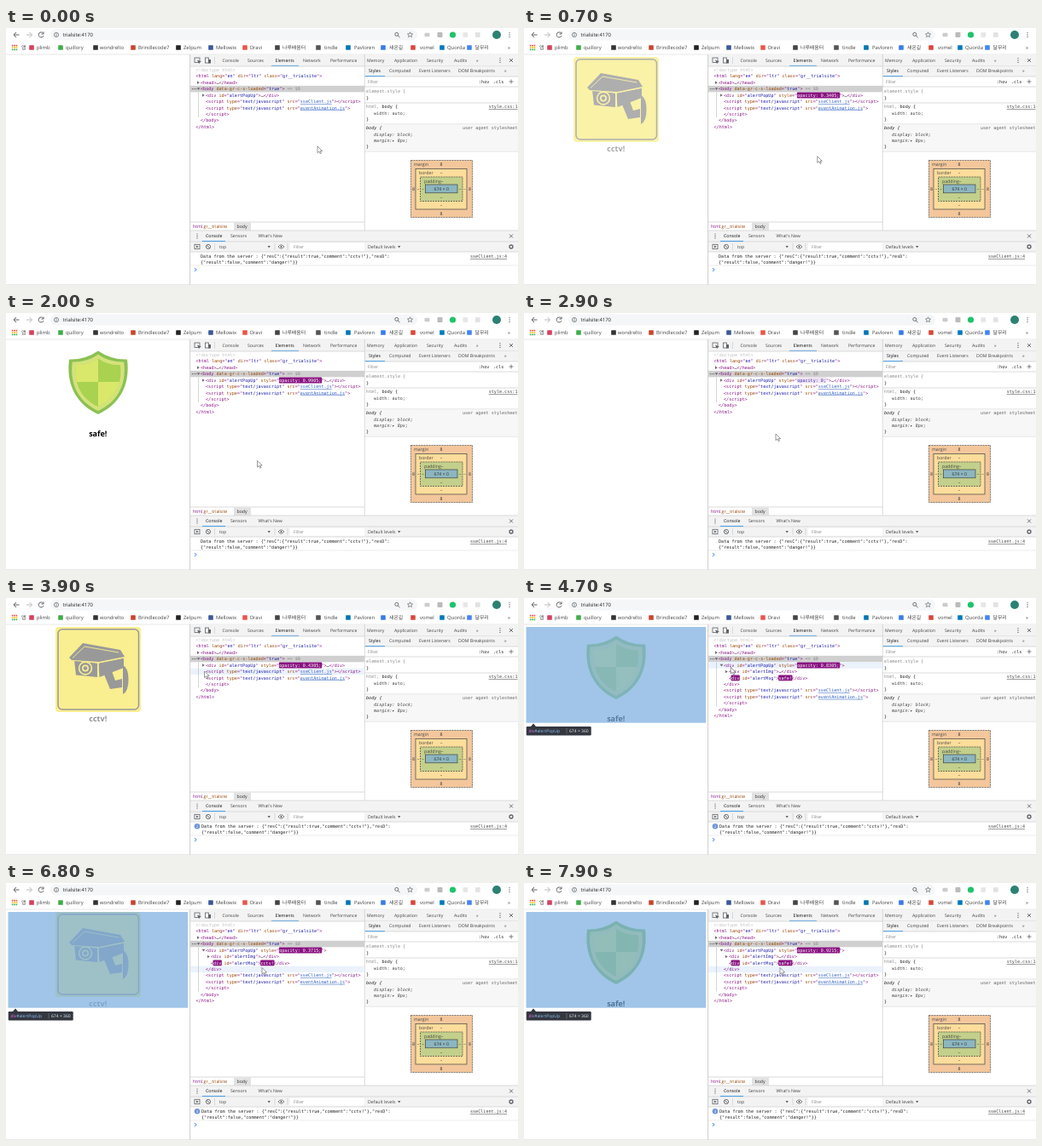
Write an HTML page that moves like this. It is 600 by 302 pixels and loops after 8000 ms.

```html
<!DOCTYPE html>
<html lang="en">
<head>
<meta charset="utf-8">
<title>Alert popup in the inspector</title>
<style>
html, body { margin: 0; width: 100%; height: 100%; overflow: hidden; background: #fff; }
svg { display: block; width: 100vw; height: 100vh; font-family: "Open Sans", "Noto Sans CJK KR", "Noto Sans CJK", sans-serif; }
text { white-space: pre; text-rendering: geometricPrecision; font-size: 5.2px; fill: #444; }
.bar { font-size: 5.9px; }
.tip { font-size: 5px; }
.mono { font-size: 5.125px; font-family: "DejaVu Sans Mono", monospace; }
.msg { font-size: 9px; font-weight: bold; font-family: "Noto Sans", sans-serif; fill: #000; }
</style>
</head>
<body>
<svg viewBox="0 0 600 302" xmlns="http://www.w3.org/2000/svg">
  <g id="base"></g><g id="page"></g><g id="overlay"></g><g id="tree"></g><g id="log"></g>
  <path id="cursor" d="M0 0V7.6L1.9 6 3.2 8.7 4.5 8.1 3.2 5.6H5.6Z" fill="#fff" stroke="#555" stroke-width=".6"/>
</svg>
<script>
const LOOP = 8000, STEP = 100, FADE = 2000, FLASH = 1000, SWAP = 1000, EXPAND = 4400;
const STARTS = [19, 3039, 6057];
const CHAR = 3.085, ROW = 7.45, TOP = 45.5;
const TAG = '#881280', ATTR = '#994500', VALUE = '#1a1aa6', LINK = '#2f5fc0', GREY = '#888', EDGE = '#ccc';
const PANEL = '#f3f3f3', ICON = '#5f6368', ACTIVE = '#4fa3e8';
const $ = id => document.getElementById(id);
const esc = s => s.replace(/&/g, '&amp;').replace(/</g, '&lt;');

const text = (x, y, s, attrs = '') => `<text x="${x}" y="${y}" ${attrs}>${esc(s)}</text>`;
const rect = (x, y, w, h, fill, attrs = '') => `<rect x="${x}" y="${y}" width="${w}" height="${h}" fill="${fill}" ${attrs}/>`;
const disc = (x, y, r, fill, attrs = '') => `<circle cx="${x}" cy="${y}" r="${r}" fill="${fill}" ${attrs}/>`;
const line = (d, stroke = EDGE, width = .7) => `<path d="${d}" fill="none" stroke="${stroke}" stroke-width="${width}"/>`;
const shape = (d, fill, attrs = '') => `<path d="${d}" fill="${fill}" ${attrs}/>`;
const code = (x, y, s, fill = '#222', attrs = '') => text(x, y, s, `class="mono" style="fill:${fill}" ${attrs}`);
const dots = (x, y) => [-2.4, 0, 2.4].map(d => disc(x, y + d, .7, ICON)).join('');
const cross = (x, y) => line(`M${x - 2} ${y - 2}l4 4m0-4l-4 4`, ICON, .9);

function browserBar() {
  const marks = [
    [30, 36, 'plimb', '#d8405f'], [64, 70, 'quillory', '#3fae49'], [105, 110, 'wondrelto', '#333'],
    [149, 155, 'Brindlecode7', '#c8452e'], [202, 208, 'Zelpum', '#222'], [240, 246, 'Mellowix', '#3b5998'],
    [280, 285.5, 'Oravi', '#e8574c'], [318, 324, '나루배움터', '#444'], [366, 373, 'tindle', '#555'],
    [401, 408, 'Pavloren', '#0077b5'], [442, 449, '새온길', '#3a7bea'], [477, 485, 'vomel', '#d9483b'],
    [511, 517, 'Quorda', '#0079bf'], [543, 549.5, '달무리', '#4285f4']];
  let s = rect(52, 1.5, 430, 13, '#f4f6f7', 'rx="6.5"')
    + line('M15.5 8H9m3-3L9 8l3 3', ICON, 1) + line('M24 8h6.5m-3-3l3 3-3 3', '#bbb', 1)
    + line('M43.6 6.2A3 3 0 1 0 44 9M44 4.5V7h-2.5', ICON, 1)
    + disc(59, 8, 2.6, 'none', `stroke="${ICON}" stroke-width=".7"`) + rect(58.6, 7.5, .8, 2, ICON) + rect(58.6, 6.3, .8, .8, ICON)
    + text(66.5, 10.2, 'trialsite:4170', 'class="bar" style="fill:#222"')
    + disc(457.8, 7.4, 2, 'none', `stroke="${ICON}" stroke-width=".9"`) + line('M459.2 8.8l2.3 2.3', ICON, 1)
    + shape('M473.5 4.8l.9 2 2.2.2-1.7 1.5.5 2.1-1.9-1.1-1.9 1.1.5-2.1-1.6-1.5 2.2-.2Z', 'none', `stroke="${ICON}" stroke-width=".7"`)
    + rect(490.5, 5.8, 6, 4.5, '#ccc', 'rx="1"') + rect(505.5, 5, 6, 6, '#bbb', 'rx="1"') + disc(523.5, 8, 3.6, '#1fc36a')
    + rect(535.5, 5.2, 5.6, 5.6, '#e6e6e6') + rect(550, 5.2, 5.6, 5.6, '#e2e2e2')
    + disc(575, 8, 5, '#2b8272') + dots(590, 8);
  ['#e94235', '#fbbc05', '#34a853'].forEach((c, i) => [0, 1, 2].forEach(j =>
    s += rect(6.8 + j * 2.4, 19.8 + i * 2.4, 1.6, 1.6, c)));
  s += text(18, 25.2, '앱', 'class="bar"') + text(588, 25.2, '»', 'class="bar"');
  for (const [ix, tx, name, color] of marks)
    s += rect(ix - 2.8, 20.2, 5.6, 5.6, color, 'rx=".6"') + text(tx, 25.2, name, 'class="bar"');
  return s + line('M0 31H600', '#ddd');
}

function boxModel() {
  const layers = [
    [474.5, 155.5, 72, 67, '#f3c79b', 'stroke-dasharray="2 1"'], [480, 165.5, 60, 47.5, '#fddd9b', ''],
    [485.5, 175, 49.5, 28.5, '#c3d08b', 'stroke-dasharray="2 1"'], [491.5, 184, 37.5, 9.8, '#8cb6c0', '']];
  const mid = 'text-anchor="middle" style="fill:#333"';
  let s = layers.map(([x, y, w, h, c, a]) => rect(x, y, w, h, c, `stroke="#444" stroke-width=".7" ${a}`)).join('');
  s += text(478, 162.3, 'margin') + text(484, 172, 'border') + text(490, 181.5, 'padding') + text(510.2, 190.8, '674 × 0', mid);
  [[510, 162.3, '8'], [510, 220, '8'], [477.4, 191, '8'], [543.4, 191, '8'], [510, 172, '–'], [510, 210, '–'],
   [483, 191, '–'], [537.6, 191, '–'], [511, 181.5, '–'], [510, 200.5, '–'], [488.6, 191, '–'], [532, 191, '–']]
    .forEach(([x, y, c]) => s += text(x, y, c, mid));
  return s;
}

function stylesPane() {
  const prop = (y, declaration) => code(431, y, declaration, '#444');
  return rect(420, 45, 180, 12, PANEL)
    + [[425, 'Styles'], [449, 'Computed'], [484, 'Event Listeners'], [530, 'DOM Breakpoints'], [584, '»']]
      .map(([x, s]) => text(x, 52.3, s, x === 425 ? 'style="fill:#111"' : '')).join('')
    + line('M420 57H600M420 69H600M420 88H600M420 113H600M420 145H600') + line('M421 56.6H444', ACTIVE, 1)
    + text(424, 65.2, 'Filter', 'style="fill:#888"') + code(554, 65, ':hov') + code(571, 65, '.cls') + line('M589.5 63h5m-2.5-2.5v5', ICON, .8)
    + code(422, 76.2, 'element.style {', GREY) + code(422, 83.8, '}')
    + code(422, 94.3, 'html, ', GREY) + code(422 + 6 * CHAR, 94.3, 'body {')
    + code(599.5, 94.3, 'style.css:1', '#444', 'text-anchor="end" text-decoration="underline"')
    + prop(101.8, 'width: auto;') + code(422, 109, '}')
    + rect(421, 113.4, 179, 31.3, '#f7f7f7')
    + code(599.5, 119.2, 'user agent stylesheet', '#666', 'text-anchor="end"')
    + `<g font-style="italic">${code(422, 119.2, 'body {')}${prop(126.8, 'display: block;')}${prop(134, 'margin:▸ 8px;')}</g>` + code(422, 141.2, '}')
    + boxModel() + line('M420.3 31V238');
}

function inspector() {
  const tabs = [[253.5, 'Console'], [283, 'Sources'], [315.5, 'Elements'], [348, 'Network'], [380, 'Performance'], [423, 'Memory'],
    [455, 'Application'], [493, 'Security'], [525, 'Audits'], [551, '»']];
  return rect(216, 31.3, 384, 13.7, PANEL)
    + rect(221, 35, 6, 5.5, 'none', `stroke="${ICON}" stroke-width=".8"`) + shape('M224 37.5l5 2-2 .7-.8 2Z', ICON)
    + rect(233.5, 35, 4, 6, 'none', `stroke="${ICON}" stroke-width=".8"`) + rect(237, 37, 3, 4.5, ICON)
    + line('M244.5 34V42')
    + tabs.map(([x, s]) => text(x, 40, s, s === 'Elements' ? 'style="fill:#111"' : '')).join('')
    + line('M311 44.4H343', ACTIVE, 1.1) + dots(579, 38) + cross(592, 38) + line('M216 45H600')
    + stylesPane()
    + line('M216 228H420') + rect(267, 228.4, 20, 9.4, '#e2e2e2')
    + `<text x="219" y="235" style="fill:${TAG}">html<tspan style="fill:${ATTR}">.gr__trialsite</tspan></text>` + text(270.5, 235, 'body', 'style="fill:#333"')
    + rect(216, 238, 384, 25, PANEL) + line('M216 238H600M216 251H600M216 263H600')
    + dots(224, 244.5) + text(234, 246.3, 'Console', 'style="fill:#111"') + text(263, 246.3, 'Sensors') + text(295.5, 246.3, "What's New")
    + line('M230 250.5H257', ACTIVE, 1.1) + cross(592, 244.5)
    + rect(221, 254.3, 6, 5.4, 'none', `stroke="${ICON}" stroke-width=".8"`) + shape('M223 255.5l2.7 1.5-2.7 1.5Z', ICON)
    + disc(237, 257, 2.6, 'none', `stroke="${ICON}" stroke-width=".9"`) + line('M235.2 255.2l3.6 3.6', ICON, .9)
    + line('M244.5 253V261M315 253V261M330 253V261')
    + text(250, 258.8, 'top') + shape('M306.5 255.9h3.4l-1.7 2.6Z', ICON)
    + shape('M319 257q3.5-4.4 7 0q-3.5 4.4-7 0Z', 'none', `stroke="${ICON}" stroke-width=".8"`) + disc(322.5, 257, 1.1, ICON)
    + rect(333, 252.5, 87, 9.3, '#fff') + text(337, 258.8, 'Filter', 'style="fill:#888"')
    + text(424, 258.8, 'Default levels') + shape('M459 255.9h3.4l-1.7 2.6Z', ICON)
    + disc(592, 257, 2, 'none', `stroke="${ICON}" stroke-width="1.3"`)
    + line('M216 279H600', '#e6e6e6') + line('M221 282l2.2 2-2.2 2', '#367cf1', .9)
    + line('M215.6 31V302', '#bbb') + line('M0 301.6H600', '#ddd');
}

function camera() {
  const ink = '#151515', gold = '#f2da00';
  return rect(58, 34, 100, 100, gold, 'rx="4"')
    + rect(61, 36.8, 94.5, 94.2, 'none', `rx="5" stroke="${ink}" stroke-width="1.5"`)
    + shape('M137 79Q143.5 82 143.5 96T137 113Z', ink)
    + shape('M115 90l9-4 4 11 8-2v10l-14 2Z', ink)
    + shape('M74 70L90 53 134 61 139 69 109 75 77 73Z', ink)
    + shape('M80 73L107 76.5V93L82 90.5Z', ink) + shape('M108.5 76.5L138 70.5V82L109.5 93Z', ink)
    + line('M78 70.5L92 57 132 64M80 73.5L108 76.3 138 70.3M108 76.5V92', gold, .9)
    + disc(93, 82.5, 7.4, ink, `stroke="${gold}" stroke-width="1.6"`)
    + disc(93, 82.5, 4, gold) + disc(93, 82.5, 2.3, ink);
}

function shield() {
  const outline = 'M108 44.5Q123 55 142 54.5C146 86 132 108 108 119C84 108 70 86 74 54.5Q93 55 108 44.5Z';
  const scaled = k => `transform="translate(108 82) scale(${k}) translate(-108 -82)"`;
  return shape(outline, '#8cc152') + shape(outline, '#d4e27a', scaled(.89))
    + `<clipPath id="core">${shape(outline, '#000', scaled(.76))}</clipPath>`
    + `<g clip-path="url(#core)">${rect(70, 40, 76, 80, '#a9d250')}${rect(70, 40, 38, 41, '#d9e86a')}${rect(108, 81, 38, 40, '#d9e86a')}</g>`;
}

// Markup segments: [colour, text, flashes, underlined]
const close = name => [[TAG, `</${name}>`]];
function open(name, attrs = {}, flashName = false) {
  const segs = [[TAG, '<'], [TAG, name, flashName]];
  for (const [key, v] of Object.entries(attrs)) {
    const link = key === 'src';
    segs.push([ATTR, ' ' + key], [TAG, '="'], [link ? LINK : VALUE, v, key === 'style', link], [TAG, '"']);
  }
  return [...segs, [TAG, '>']];
}

function markup(x, row, segs, flash) {
  const y = TOP + row * ROW;
  let back = '', spans = '', pos = x;
  for (const [color, s, flashes, link] of segs) {
    const lit = flashes && flash > 0;
    const w = s.length * CHAR;
    if (lit && s) back += rect(pos - .5, y + .3, w + 1, ROW - .6, TAG, `rx="1" opacity="${flash}"`);
    const fill = lit ? `color-mix(in srgb, #fff ${flash * 100}%, ${color})` : color;
    spans += `<tspan style="fill:${fill}" ${link ? 'text-decoration="underline"' : ''}>${esc(s)}</tspan>`;
    pos += w;
  }
  return back + `<text class="mono" x="${x}" y="${y + 5.3}">${spans}</text>`;
}

function treeRows({ style, message, expanded }) {
  const more = [['#222', '…']];
  const popup = open('div', style === null ? { id: 'alertPopUp' } : { id: 'alertPopUp', style });
  const script = src => open('script', { type: 'text/javascript', src });
  const inner = expanded ? [
    [234, popup, '▾'],
    [240, [...open('div', { id: 'alertImg' }), ...more, ...close('div')], '▸'],
    [240, [...open('div', { id: 'alertMsg' }, true), ['#222', message, true], ...close('div')]],
    [234, close('div')]] : [[234, [...popup, ...more, ...close('div')], '▸']];
  return [
    [222.5, [['#c0c0c0', '<!doctype html>']]],
    [222.5, open('html', { lang: 'en', dir: 'ltr', class: 'gr__trialsite' })],
    [228, [...open('head'), ...more, ...close('head')], '▸'],
    [228, [...open('body', { 'data-gr-c-s-loaded': 'true' }), [GREY, ' == $0']], '▾'],
    ...inner,
    [234, [...script('sseClient.js'), ...close('script')]],
    [234, script('eventAnimation.js')], [234, close('script')],
    [228, close('body')], [222.5, close('html')]];
}

function drawTree(state, hover) {
  const rows = treeRows(state);
  const band = (row, fill) => rect(216, TOP + row * ROW, 204, ROW, fill);
  let s = band(3, '#d0d0d0');
  if (hover !== 3 && hover >= 0 && hover < rows.length) s += band(hover, '#ebf2fc');
  s += line(`M225.5 ${TOP + 4 * ROW}V${TOP + (rows.length - 2) * ROW}`, '#bbb', .6);
  s += [218.5, 220.5, 222.5].map(x => disc(x, TOP + 3.5 * ROW, .6, '#555')).join('');
  rows.forEach(([x, segs, arrow], i) => {
    const y = TOP + (i + .5) * ROW;
    if (arrow) s += shape(arrow === '▸' ? `M${x - 4} ${y - 1.8}l2.8 1.8-2.8 1.8Z` : `M${x - 4.4} ${y - 1.3}h3.8l-1.9 2.8Z`, '#6e6e6e');
    s += markup(x, i, segs, state.flash);
  });
  return s;
}

function drawOverlay(shown) {
  const y = shown ? 151 : 38.3;
  const [size, width] = shown ? ['674 × 360', 76] : ['674 × 0', 69.5];
  return (shown ? rect(2.5, 34, 210.7, 112.7, '#6fa8dc', 'opacity=".66"') : '')
    + shape(`M8 ${y}l3-3.6 3 3.6Z`, '#333740') + rect(2.7, y, width, 10.5, '#333740', 'rx="1.2"')
    + `<text class="tip" x="5.5" y="${y + 7}" style="fill:#e776e0">div<tspan style="fill:#8fc1f5">#alertPopUp</tspan></text>`
    + line(`M50 ${y + 2}v6.5`, '#777') + text(53, y + 7, size, 'class="tip" style="fill:#eee"');
}

function drawLog(count) {
  const x = count > 1 ? 229 : 228;
  return (count > 1 ? disc(224, 268.3, 3.2, '#6f93d6') + text(224, 270, String(count), 'text-anchor="middle" style="fill:#fff;font-size:4.6px"') : '')
    + code(x, 270, 'Data from the server : {"resC":{"result":true,"comment":"cctv!"},"resD":')
    + code(x, 277, '{"result":false,"comment":"danger!"}}')
    + code(587, 270, 'sseClient.js:4', '#444', 'text-anchor="end" text-decoration="underline"');
}

const PATH = [[0, 365, 139], [300, 365, 139], [1400, 294.5, 178], [1800, 294.5, 178], [2700, 295, 142], [3000, 295, 142],
  [3800, 232.5, 86], [3950, 232.5, 86], [4300, 230, 78], [4500, 230, 78], [5300, 309, 99.5], [5700, 309, 99.5], [6500, 300, 99.5], [LOOP, 300, 99.5]];

function cursorAt(t) {
  const i = PATH.findIndex(p => p[0] > t);
  const [t0, x0, y0] = PATH[i - 1], [t1, x1, y1] = PATH[i];
  const u = (t - t0) / (t1 - t0), k = u * u * (3 - 2 * u);
  return [x0 + (x1 - x0) * k, y0 + (y1 - y0) * k];
}

function draw(t) {
  const count = STARTS.filter(s => s <= t).length;
  const age = count ? t - STARTS[count - 1] : Infinity;
  const shown = age < FADE;
  const opacity = shown ? age / FADE : 0;
  const message = !shown ? '' : age < SWAP ? 'cctv!' : 'safe!';
  const expanded = t >= EXPAND;
  const state = {
    message, expanded,
    style: count ? `opacity: ${+opacity.toFixed(4)};` : null,
    flash: shown ? 1 : Math.max(0, 1 - (age - FADE) / FLASH)
  };
  const [x, y] = cursorAt(t);
  const hover = Math.floor((y - TOP) / ROW);
  const onPopup = hover >= 4 && hover <= (expanded ? 7 : 4);

  $('page').setAttribute('opacity', opacity);
  $('page').innerHTML = shown ? (message === 'cctv!' ? camera() : shield()) + text(107.8, 144.5, message, 'class="msg" text-anchor="middle"') : '';
  $('overlay').innerHTML = onPopup ? drawOverlay(shown) : '';
  $('tree').innerHTML = drawTree(state, hover);
  $('log').innerHTML = drawLog(Math.max(1, count));
  $('cursor').setAttribute('transform', `translate(${x} ${y})`);
}

$('base').innerHTML = browserBar() + inspector();
const began = performance.now();
let last = -1;
function tick() {
  const t = Math.floor((performance.now() - began) % LOOP / STEP) * STEP;
  if (t !== last) draw(last = t);
  requestAnimationFrame(tick);
}
tick();
</script>
</body>
</html>
```
